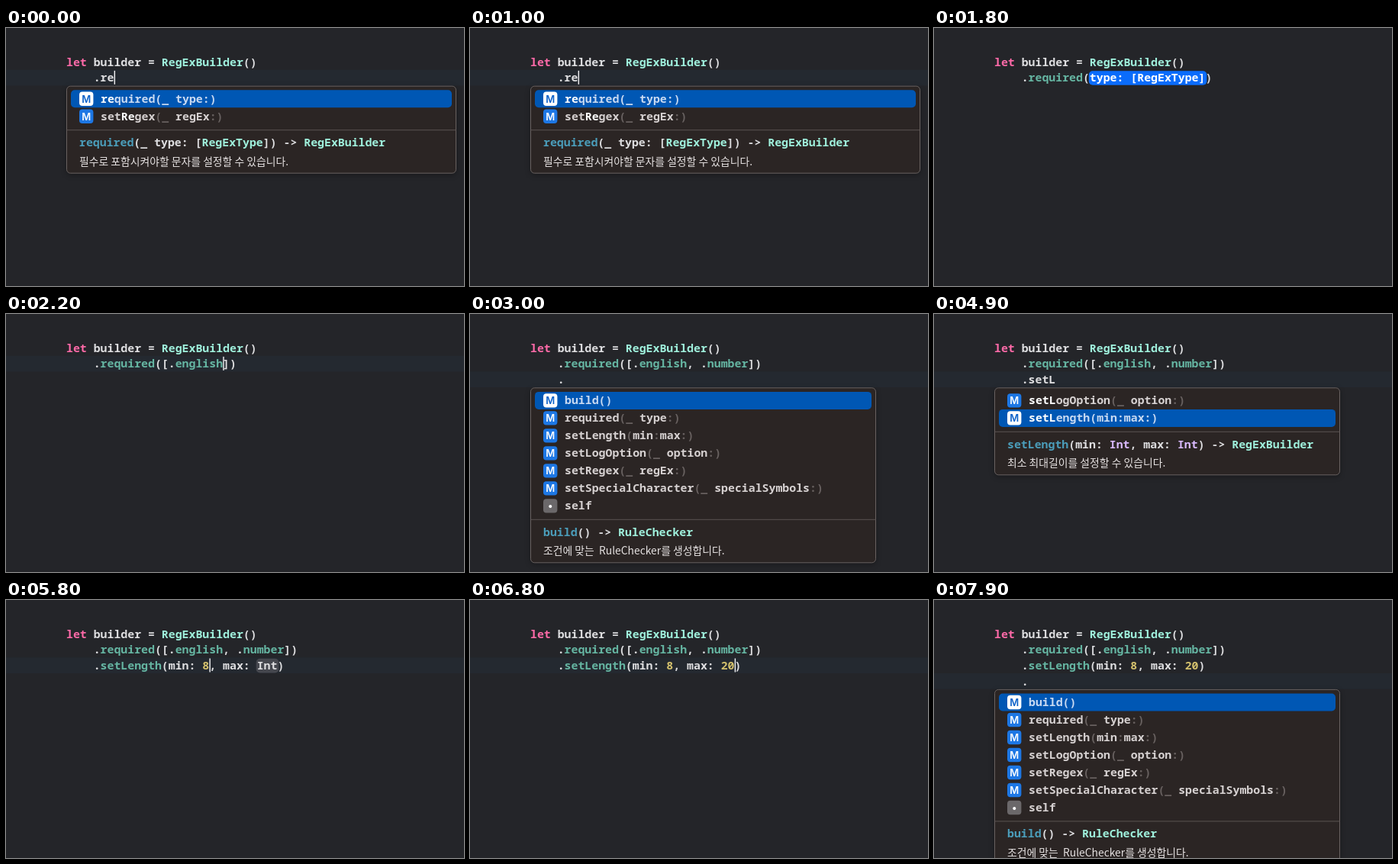
An HTML page with a canvas that plays this animation: 600 by 338 pixels, repeating every 8 s.

```html
<!DOCTYPE html>
<html lang="ko">
<head>
<meta charset="utf-8">
<title>Code completion</title>
<style>
html, body { margin: 0; width: 100%; height: 100%; overflow: hidden; background: #242529; }
canvas { display: block; width: 600px; height: 338px; }
</style>
</head>
<body>
<canvas id="stage"></canvas>
<script>
const W = 600, H = 338, LOOP = 8000;
const canvas = document.getElementById("stage");
const ctx = canvas.getContext("2d");
const dpr = window.devicePixelRatio || 1;
canvas.width = W * dpr;
canvas.height = H * dpr;

const MONO = '14.87px "Noto Sans Mono", "DejaVu Sans Mono", monospace';
const DOC = '500 13.85px "Noto Sans CJK KR", "Noto Sans CJK", "Noto Sans", sans-serif';
const BADGE = '600 13px Inter, "Open Sans", sans-serif';
const LEFT = 79, TOP = 49.8, LINE = 20.6, ROW = 23, COL = 8.92;

// Style key -> [colour, weight, pill colour]
const STYLES = {
  k: ["#ff6aa8", 700],
  w: ["#dedee0", 600],
  t: ["#9ff0dc", 600],
  m: ["#65b5a2", 600],
  n: ["#d4c16d", 600],
  f: ["#4b9dba", 600],
  i: ["#dabaff", 600],
  d: ["#686160", 600],
  r: ["#d6d1d1", 600],
  s: ["#c9daf2", 600],
  b: ["#ffffff", 700],
  p: ["#ffffff", 700, "#0a6cfb"],
  q: ["#dedee0", 600, "#45474e"]
};

function box(x, y, w, h, r, fill, stroke) {
  ctx.beginPath();
  ctx.roundRect(x, y, w, h, r);
  if (fill) { ctx.fillStyle = fill; ctx.fill(); }
  if (stroke) { ctx.strokeStyle = stroke; ctx.lineWidth = 1; ctx.stroke(); }
}

// Markup: runs split by a backtick, first letter is the style, "|" is the caret.
function drawRuns(markup, x, y) {
  for (const run of markup.split("`")) {
    if (run === "|") {
      ctx.fillStyle = "#f4f4f6";
      ctx.fillRect(x + 0.2, y - 14.5, 1.4, 18);
      continue;
    }
    const [color, weight, pill] = STYLES[run[0]], text = run.slice(1);
    ctx.font = weight + " " + MONO;
    const w = ctx.measureText(text).width;
    if (pill) box(x - 1, y - 14.2, w + 3, 18.6, 5, pill);
    ctx.fillStyle = color;
    ctx.fillText(text, x, y);
    x += w;
  }
}

function drawBadge(x, cy, letter, active) {
  const dot = letter === "•";
  box(x, cy - 9.2, 18.4, 18.4, 4, active ? "#ffffff" : dot ? "#6b686a" : "#1d77e4");
  ctx.font = BADGE;
  ctx.textAlign = "center";
  ctx.fillStyle = active ? "#0a60c8" : "#ffffff";
  ctx.fillText(letter, x + 9.2, cy + 4.8);
  ctx.textAlign = "left";
}

function drawPopup(p, line) {
  const x = LEFT + 0.5 + (p.col - 5) * COL;
  const y = TOP + line * LINE + 5.8;
  const rule = y + 11 + p.rows.length * ROW;
  const h = rule - y + (p.doc ? 57 : 37);
  ctx.save();
  ctx.shadowColor = "rgba(0,0,0,0.35)";
  ctx.shadowBlur = 7 * dpr;
  ctx.shadowOffsetY = 2 * dpr;
  box(x, y, p.width, h, 5, "#2b2524");
  ctx.restore();
  box(x, y, p.width, h, 5, null, "#696261");

  p.rows.forEach((row, i) => {
    const cy = y + 16.6 + i * ROW, on = i === p.pick;
    if (on) box(x + 5.5, cy - 11.5, p.width - 11, ROW, 5, "#0057b4");
    drawBadge(x + 16.5, cy, row[0], on);
    const text = on ? row[1].replace(/(^|`)[rd]/g, "$1s") : row[1];
    drawRuns(text, x + 44.5, cy + 5);
  });

  ctx.fillStyle = "#5a5352";
  ctx.fillRect(x, rule, p.width, 1);
  drawRuns(p.sig, x + 16.5, rule + 22);
  if (p.doc) {
    ctx.font = DOC;
    ctx.fillStyle = "#e6e2e2";
    ctx.fillText(p.doc, x + 16.5, rule + 46.3);
  }
}

const item = (text, letter = "M") => [letter, text];
const popup = (rows, pick, sig, doc, width = 452, col = 5) => ({ rows, pick, sig, doc, width, col });

const build = item("rbuild()");
const required = item("rrequired`d(_ `rtype`d:)");
const setLength = item("rsetLength`d(`rmin`d:`rmax`d:)");
const setLog = item("rsetLogOption`d(_ `roption`d:)");
const setRegex = item("rsetRegex`d(_ `rregEx`d:)");
const setSpecial = item("rsetSpecialCharacter`d(_ `rspecialSymbols`d:)");
const self = item("rself", "•");

// Highlights the typed prefix of a row.
const match = (row, typed) => [row[0], row[1].replace("r" + typed, "b" + typed + "`r")];

const lengthSig = "fsetLength`w(min: `iInt`w, max: `iInt`w) -> `tRegExBuilder";
const lengthDoc = "최소 최대길이를 설정할 수 있습니다.";
const logSig = "fsetLogOption`w(_ option: `tLogOption`w) -> `tRegExBuilder";
const logDoc = "로그 옵션을 설정할 수 있습니다.";

const rePopup = popup(
  [match(required, "re"), item("rset`bRe`rgex`d(_ `rregEx`d:)")], 0,
  "frequired`w(_ type: [`tRegExType`w]) -> `tRegExBuilder",
  "필수로 포함시켜야할 문자를 설정할 수 있습니다.", 510);
const allPopup = popup(
  [build, required, setLength, setLog, setRegex, setSpecial, self], 0,
  "fbuild`w() -> `tRuleChecker", "조건에 맞는  RuleChecker를 생성합니다.");
const typedPopup = (typed, rows) =>
  popup(rows.map(r => match(r, typed)), 0, lengthSig, lengthDoc);
const setters = [setLength, setLog, setRegex, setSpecial];
const logPick = popup([setLog, setLength].map(r => match(r, "setL")), 0, logSig, logDoc);
const lengthPick = { ...logPick, pick: 1, sig: lengthSig, doc: lengthDoc };

const kinds = ["english", "number", "korean", "lowercase", "uppercase", "symbol", "space", "custom"];
const casePopup = (pick, col) => popup(
  kinds.map(k => item("r" + k, "C")), pick,
  "tRegExType`w.`f" + kinds[pick], "", 452, col);

const first = "klet`w builder = `tRegExBuilder`w()";
const req = "w.`mrequired`w(";
const full = req + "[.`menglish`w, .`mnumber`w])";
const len = "w.`msetLength`w(";

// Each step: start time, lines below the first, popup, plain background flag
const steps = [
  [0, ["w.re`|"], rePopup],
  [1400, [req + "`ptype: [RegExType]`w)"], null, true],
  [1900, [req + "[`|`w])"]],
  [2000, [req + "[.`|`w])"], casePopup(0, 16)],
  [2200, [req + "[.`menglish`|`w])"]],
  [2300, [req + "[.`menglish`w, `|`w])"]],
  [2400, [req + "[.`menglish`w, .`|`w])"], casePopup(1, 26)],
  [2600, [req + "[.`menglish`w, .`mnumber`|`w])"]],
  [2800, [full, "|"]],
  [2900, [full, "w."]],
  [3000, [full, "w."], allPopup],
  [3300, [full, "w.s"], typedPopup("s", [...setters, self])],
  [3400, [full, "w.se"], typedPopup("se", [...setters, self])],
  [3500, [full, "w.set"], typedPopup("set", setters)],
  [3600, [full, "w.setL"], logPick],
  [4200, [full, "w.setL"], lengthPick],
  [5100, [full, len + "min: `pInt`w, max: `qInt`w)"], null, true],
  [5700, [full, len + "min: `n8`|`w, max: `qInt`w)"]],
  [6100, [full, len + "min: `n8`w, max: `pInt`w)"], null, true],
  [6500, [full, len + "min: `n8`w, max: `n2`|`w)"]],
  [6600, [full, len + "min: `n8`w, max: `n20`|`w)"]],
  [7200, [full, len + "min: `n8`w, max: `n20`w)", "|"]],
  [7400, [full, len + "min: `n8`w, max: `n20`w)", "w."]],
  [7500, [full, len + "min: `n8`w, max: `n20`w)", "w."], allPopup]
];

function draw(time) {
  const [, lines, list, plain] = steps.findLast(s => s[0] <= time);
  ctx.setTransform(dpr, 0, 0, dpr, 0, 0);
  ctx.fillStyle = "#242529";
  ctx.fillRect(0, 0, W, H);
  const last = lines.length;
  if (!plain) {
    ctx.fillStyle = "#242930";
    ctx.fillRect(0, TOP + last * LINE - 15.6, W, LINE);
  }
  drawRuns(first, LEFT, TOP);
  lines.forEach((text, i) => drawRuns(text, LEFT + 4 * COL, TOP + (i + 1) * LINE));
  if (list) drawPopup(list, last);
}

const start = performance.now();
function tick() {
  draw((performance.now() - start) % LOOP);
  requestAnimationFrame(tick);
}
tick();
</script>
</body>
</html>
```
